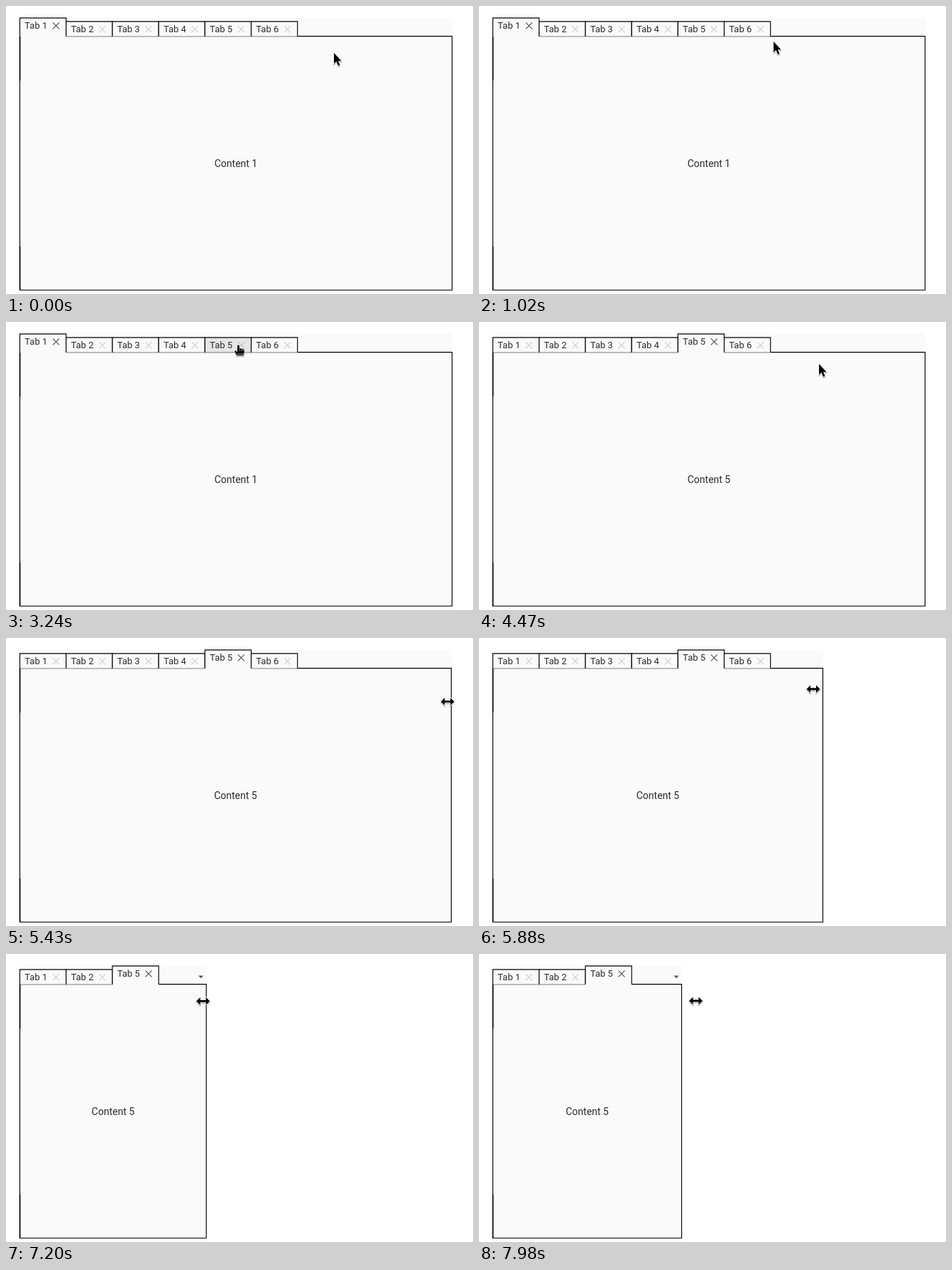
These frames come from a looping animation (658 by 406 pixels, 8 s). An HTML page:

```html
<!DOCTYPE html>
<html lang="en">
<head>
<meta charset="utf-8">
<title>Resizable tabs</title>
<style>
  html, body { margin: 0; width: 100%; height: 100%; overflow: hidden; background: #fff; }
  svg { display: block; width: 658px; height: 406px; }
  text { font: 13px Roboto, sans-serif; fill: #2b2b2b; }
  .content { font-size: 14px; text-anchor: middle; }
  .surface { fill: #fafafa; }
  .line { fill: none; stroke: #000; stroke-width: 1.15; }
  .bold { fill: none; stroke: #000; stroke-width: 1.6; }
  .tab .fill { fill: #fafafa; }
  .tab .close { fill: none; stroke: #505050; stroke-width: 1.15; opacity: .25; }
  .tab.hover .fill { fill: #e6e6e6; }
  .tab.active .fill { fill: #fafafa; }
  .tab.active .close { opacity: 1; }
  .arrow { fill: #555; }
  .cursor { fill: #000; stroke: #fff; stroke-width: 2; stroke-linejoin: round; paint-order: stroke;
            filter: drop-shadow(.6px 1px .7px rgba(0, 0, 0, .4)); }
  .knuckles { fill: none; stroke: #fff; stroke-width: .7; }
</style>
</head>
<body>
<svg viewBox="0 0 658 406">
  <rect id="surface" class="surface" x="19" y="16" height="385"/>
  <path id="frame" class="line"/>
  <path class="bold" d="M19.6 43V105M19.6 339V401"/>
  <g id="tabs"></g>
  <path id="more" class="arrow" d="M-3.6 -1.8H3.6L0 1.9Z"/>
  <text id="content" class="content" y="227"></text>
  <g id="pointer" class="cursor"><path d="M0 0V15.5L3.5 12.3L6.1 18.2L8.6 17.1L6 11.4H10.6Z"/></g>
  <g id="hand" class="cursor">
    <path d="M-1.5 1Q0 -1 1.5 1V5Q3 4 4.2 5.4Q5.6 4.6 6.6 6Q8.2 5.6 8.4 7.5V11L7 15H-2L-5.4 9.5Q-6 7.6 -4 7.6L-1.5 9.6Z"/>
    <path class="knuckles" d="M1.6 5.4V8M4.2 6V8.4M6.6 6.6V8.8M-1.8 12.8H7.2"/>
  </g>
  <g id="resize" class="cursor"><path d="M-9.5 0L-4 -5.4V-1.4H4V-5.4L9.5 0L4 5.4V1.4H-4V5.4Z"/></g>
</svg>
<script>
const LOOP = 8000, STEP = 30, LEFT = 19.5, TAB = 65.2, COUNT = 6, MENU = 17;
const CLICK = 3930, DRAG = 5370, LAG = 60, GRIP = 3;
const $ = id => document.getElementById(id);

// Mouse path: time, x, y
const path = [
  [0, 462, 66], [150, 462, 66], [180, 461.5, 66], [270, 461.5, 66], [300, 461, 66], [510, 461, 66],
  [540, 460, 66], [660, 460, 66], [1020, 415, 50], [1260, 365, 40], [1470, 290, 34.5], [1500, 278, 34],
  [2040, 185, 33], [2160, 185, 33], [2280, 238, 33], [2520, 315, 34], [2880, 378, 34], [3060, 378, 34],
  [3300, 318, 32], [3900, 318, 32], [4470, 479, 59], [4710, 588, 75], [5070, 631.5, 91],
  [5340, 631.5, 91], [5820, 487.5, 73], [5880, 471, 72], [6150, 429.5, 70], [6660, 350.5, 67],
  [6720, 343.5, 67], [6960, 308.5, 67], [7440, 261, 66], [7740, 261, 66], [7920, 288.5, 66],
  [7980, 305.5, 66], [8000, 305.5, 66]
];

const slope = (i, k) => (path[i + 1][k] - path[i][k]) / (path[i + 1][0] - path[i][0]);

function tangent(i, k) {
  if (i === 0 || i === path.length - 1) return 0;
  const a = slope(i - 1, k), b = slope(i, k);
  return a * b > 0 ? 2 * a * b / (a + b) : 0;
}

// Monotone cubic, so the mouse never overshoots a resting place
function mouse(t, k) {
  let i = 0;
  while (i < path.length - 2 && t >= path[i + 1][0]) i++;
  const span = path[i + 1][0] - path[i][0], u = (t - path[i][0]) / span, v = 1 - u;
  return path[i][k] * v * v * (1 + 2 * u) + path[i + 1][k] * u * u * (3 - 2 * u)
    + span * u * v * (tangent(i, k) * v - tangent(i + 1, k) * u);
}

$('tabs').innerHTML = Array.from({ length: COUNT }, (_, i) => `
  <g class="tab">
    <path class="fill"/><path class="line"/>
    <g class="label"><text x="6.8" y="15.5">Tab ${i + 1}</text>
    <path class="close" d="M46.5 6.5l9 9m0 -9l-9 9"/></g>
  </g>`).join('');
const tabs = [...$('tabs').children];

const place = (el, x, y) => el.setAttribute('transform', `translate(${x} ${y})`);
const show = (el, on) => el.style.display = on ? '' : 'none';

function visibleTabs(edge, active) {
  const all = tabs.map((_, i) => i);
  if (LEFT + TAB * COUNT <= edge) return all;
  const room = Math.floor((edge - MENU - LEFT) / TAB);
  const others = all.filter(i => i !== active).slice(0, room - 1);
  return [...others, active].sort((a, b) => a - b);
}

function render(t) {
  const x = mouse(t, 1), y = mouse(t, 2);
  const dragging = t >= DRAG;
  const edge = dragging ? mouse(t - LAG, 1) - GRIP : 628.5;
  const active = t < CLICK ? 0 : 4;
  const shown = visibleTabs(edge, active);
  const overTabs = !dragging && y > 21 && y < 42;
  const hovered = overTabs ? shown[Math.floor((x - LEFT) / TAB)] : undefined;

  tabs.forEach((tab, i) => {
    const slot = shown.indexOf(i), top = i === active ? -5 : 0;
    show(tab, slot >= 0);
    if (slot < 0) return;
    place(tab, LEFT + slot * TAB, 21.8);
    tab.setAttribute('class', `tab${i === active ? ' active' : ''}${i === hovered ? ' hover' : ''}`);
    const d = `M0 21V${top}H${TAB}V21`;
    tab.children[0].setAttribute('d', d);
    tab.children[1].setAttribute('d', d);
    place(tab.children[2], 0, top);
  });

  const gap = LEFT + shown.indexOf(active) * TAB;
  $('frame').setAttribute('d', `M${gap + TAB} 42.6H${edge}V400.5H${LEFT}V42.6H${gap}`);
  $('surface').setAttribute('width', edge - 18.5);
  place($('more'), edge - 7.5, 32.4);
  show($('more'), shown.length < COUNT);
  $('content').setAttribute('x', (LEFT + edge) / 2);
  $('content').textContent = `Content ${active + 1}`;

  const kind = dragging || Math.abs(x - edge) < 7 ? 'resize' : hovered !== undefined ? 'hand' : 'pointer';
  for (const id of ['pointer', 'hand', 'resize']) {
    show($(id), id === kind);
    place($(id), x, y);
  }
}

let start;
function tick(now) {
  start ??= now;
  const t = (now - start) % LOOP;
  render(Math.floor(t / STEP) * STEP);
  requestAnimationFrame(tick);
}
render(0);
requestAnimationFrame(tick);
</script>
</body>
</html>
```
